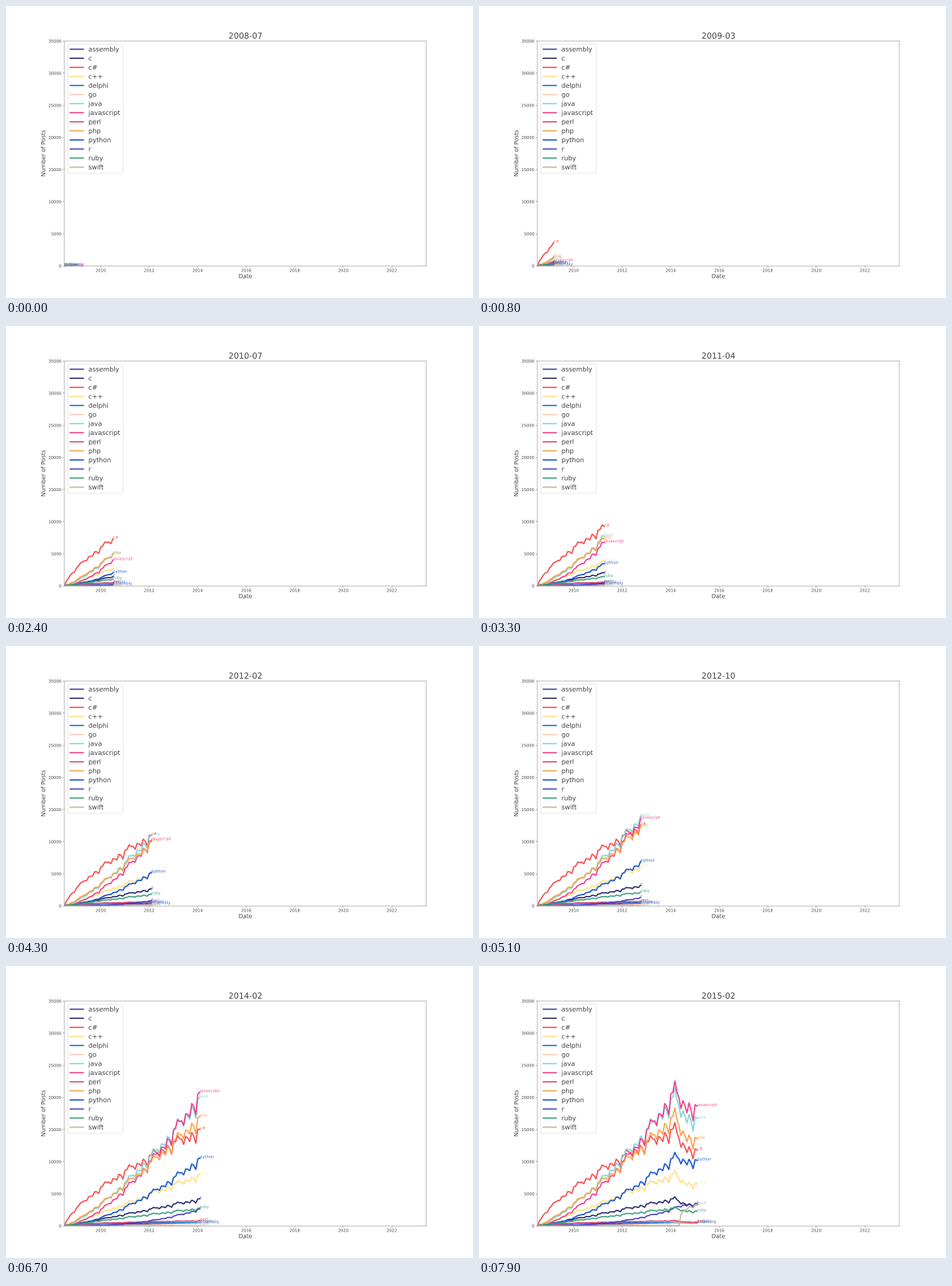
Recreate the animation shown at these times as a matplotlib script. Size 600x375 px, loop 8 s.

```python
import numpy as np
import matplotlib.pyplot as plt
from matplotlib.animation import FuncAnimation
from matplotlib.patches import FancyBboxPatch
from matplotlib.patheffects import Normal

INK, EDGE = "0.25", "0.35"
# Outline text keeps small labels smooth and unhinted
plt.rcParams.update({
    "font.family": "DejaVu Sans", "path.effects": [Normal()],
    "text.color": INK, "axes.labelcolor": INK, "axes.edgecolor": EDGE,
    "xtick.color": EDGE, "ytick.color": EDGE,
    "xtick.labelcolor": INK, "ytick.labelcolor": INK,
})

W, H, DPI = 600, 375, 37.5
FRAMES = 80
START = 2008 * 12 + 6  # July 2008, in months
PEAK = 68              # March 2014
SWIFT_RELEASE = 71     # June 2014

# name: colour, level at the peak, growth exponent, level it settles at
LANGUAGES = {
    "assembly": ("#2f3f98", 420, 0.9, 440),
    "c": ("#26266e", 4200, 1.05, 3150),
    "c#": ("#fb4848", 14900, 0.7, 11350),
    "c++": ("#ffe080", 8000, 1.05, 6300),
    "delphi": ("#0a74d8", 520, 0.25, 490),
    "go": ("#f8ccb8", 420, 2, 490),
    "java": ("#7fd4d8", 20000, 1.35, 16150),
    "javascript": ("#ee3c8a", 20900, 1.6, 18100),
    "perl": ("#dc4468", 800, 0.5, 550),
    "php": ("#f8a048", 17000, 1.2, 13050),
    "python": ("#1450cc", 10600, 1.6, 9950),
    "r": ("#4a40bc", 2700, 2.6, 3480),
    "ruby": ("#36a274", 2750, 0.95, 2200),
    "swift": ("#c0b898", 0, 1, 3500),
}

# Seasonal activity, January to December
SEASON = np.array([1.03, 1.02, 1.08, 1.03, 1.01, 0.94,
                   1.02, 0.99, 0.94, 1.03, 0.98, 0.89])

months = np.arange(FRAMES)


def posts(peak, power, final):
    """Power-law growth up to the peak, then decay to the final level."""
    growth = peak * (months / PEAK) ** power
    decay = final + (peak - final) * np.exp((PEAK - months) / 4)
    trend = np.where(months <= PEAK, growth, decay)
    return trend * SEASON[(START + months) % 12]


def draw_legend(fig):
    ax = fig.add_axes([0, 0, 1, 1], zorder=5)
    ax.set(xlim=(0, W), ylim=(H, 0))
    ax.axis("off")
    ax.add_patch(FancyBboxPatch(
        (79.3, 49), 71, 166, boxstyle="round,pad=0,rounding_size=1.7",
        fc="white", ec="0.8", lw=1, alpha=0.8))
    for i, (name, (color, *_)) in enumerate(LANGUAGES.items()):
        y = 55.5 + 11.65 * i
        ax.plot([82.5, 99.2], [y, y], color=color, lw=3, snap=False)
        ax.text(105.9, y + 2.9, name, fontsize=16)


fig, ax = plt.subplots(figsize=(W / DPI, H / DPI), dpi=DPI)
ax.set(xlim=(0, 179), ylim=(0, 35000))
ax.set_xticks(np.arange(18, 179, 24), [str(y) for y in range(2010, 2023, 2)])
ax.set_xlabel("Date", fontsize=14)
ax.set_ylabel("Number of Posts", fontsize=14, labelpad=6)
title = ax.set_title("", fontsize=20)
draw_legend(fig)

data, lines, tags = {}, {}, {}
for name, (color, *shape) in LANGUAGES.items():
    data[name] = posts(*shape)
    lines[name], = ax.plot([], [], color=color, lw=3)
    tags[name] = ax.text(0, 0, name, color=color, fontsize=10, alpha=0.85)
data["swift"][:SWIFT_RELEASE] = 0


def update(i):
    year, month = divmod(START + i, 12)
    title.set_text(f"{year}-{month + 1:02d}")
    for name, values in data.items():
        lines[name].set_data(months[:i + 1], values[:i + 1])
        tags[name].set_position((i, values[i]))
    return [title, *lines.values(), *tags.values()]


anim = FuncAnimation(fig, update, frames=FRAMES, interval=100,
                     repeat=True, repeat_delay=0, blit=False)
plt.show()
```
